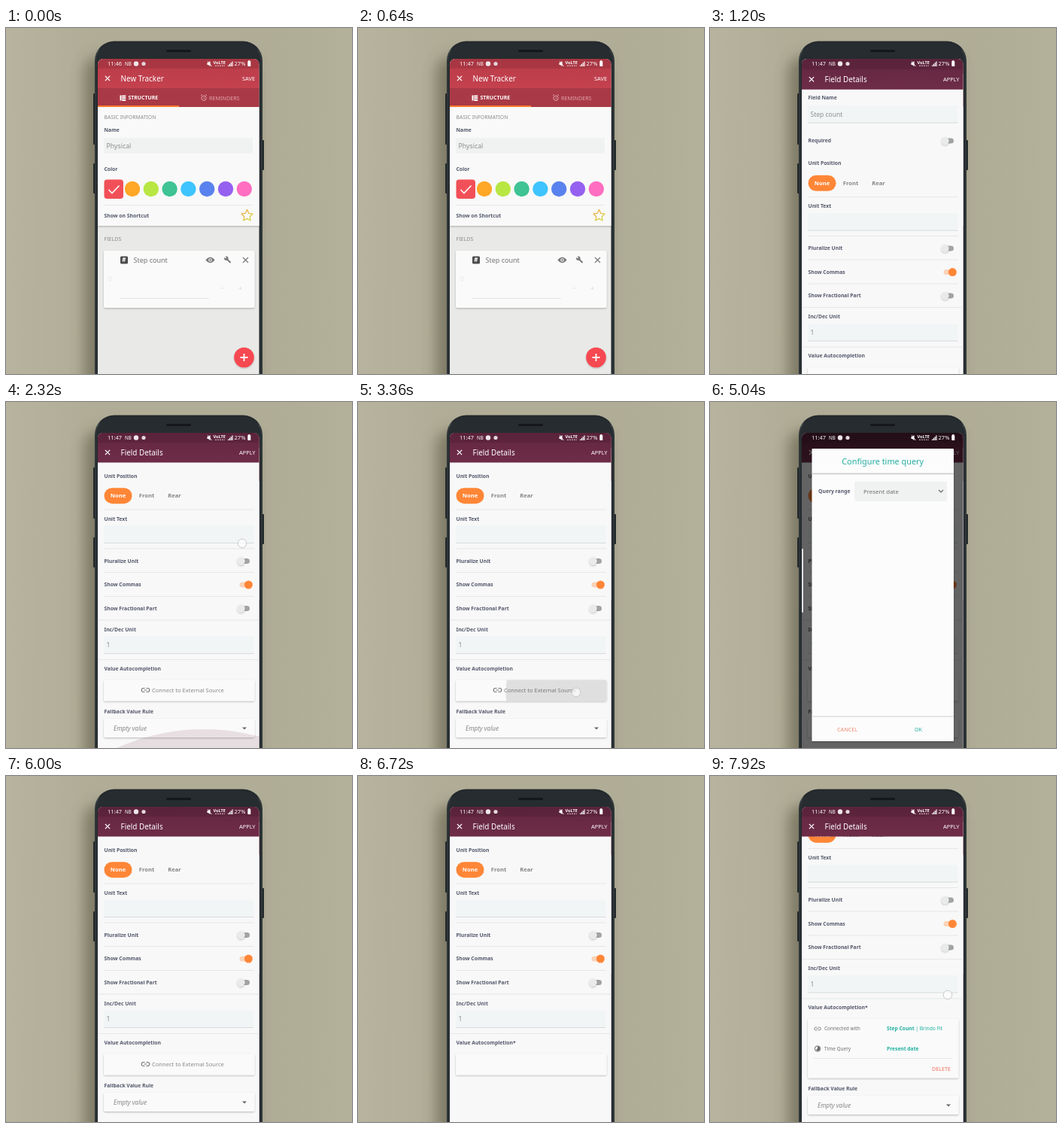
Write an HTML page that moves like this. It is 460 px wide and 460 px high and loops after 8 s.

```html
<!DOCTYPE html>
<html lang="en">
<head>
<meta charset="utf-8">
<style>
html, body { margin: 0; width: 100%; height: 100%; overflow: hidden; background: #b3b09a; }
svg { display: block; width: 100vw; height: 100vh; font-family: "Noto Sans", "Open Sans", sans-serif; }
text { white-space: pre; }
</style>
</head>
<body>
<svg id="stage" viewBox="0 0 460 460"></svg>
<script>
const stage = document.getElementById('stage');

// ---- drawing helpers (text y is the middle of the capitals) ----
const text = (x, y, size, fill, str, more = '') =>
  `<text x="${x}" y="${y + size * .357}" font-size="${size}" fill="${fill}" ${more}>${str}</text>`;
const rect = (x, y, w, h, fill, r = 0, more = '') =>
  `<rect x="${x}" y="${y}" width="${w}" height="${h}" rx="${r}" fill="${fill}" ${more}/>`;
const disc = (x, y, r, fill, more = '') => `<circle cx="${x}" cy="${y}" r="${r}" fill="${fill}" ${more}/>`;
const line = (d, color, w = 1, more = '') =>
  `<path d="${d}" fill="none" stroke="${color}" stroke-width="${w}" ${more}/>`;
const group = (id, body, more = '') => `<g id="${id}" ${more}>${body}</g>`;
const gradient = (id, dir, stops) => `<linearGradient id="${id}" ${dir}>` +
  stops.map(([at, c]) => `<stop offset="${at}" stop-color="${c}"/>`).join('') + '</linearGradient>';

const bold = 'font-weight="600"';
const label = (y, str, x = 130.5) => text(x, y, 6.8, '#54576b', str, bold);
const rule = (y, x = 130, w = 200) => rect(x, y - .5, w, 1, '#e6e7e7');
const input = (y, str) => rect(130, y, 199.5, 23, '#f2f5f5') + rect(130, y + 22.5, 199.5, 1, '#d8dbdb') +
  text(133.5, y + 11.5, 8.5, '#8b8d8d', str);
const toggle = (y, on) => on
  ? rect(310.5, y - 3.5, 14, 7, '#fbd3b8', 3.5) + disc(322.4, y, 5.5, '#ff8637')
  : rect(310, y - 3.5, 14, 7, '#a3a3a3', 3.5) + disc(312.5, y, 5.2, '#e9eaea', 'filter="url(#soft)"');
const card = (y, h, id = '') => rect(130, y, 200.5, h, '#fafafa', 2, `${id} filter="url(#soft)"`);
const cross = (x, y, r, color, w) =>
  line(`M${x - r} ${y - r}l${2 * r} ${2 * r}m0 ${-2 * r}l${-2 * r} ${2 * r}`, color, w);
const link = (x, y, s) => line('M-1 -2.5H-2.8A2.5 2.5 0 0 0 -2.8 2.5H-1M1 -2.5H2.8A2.5 2.5 0 0 1 2.8 2.5H1M-2 0H2',
  '#777', 1.1, `transform="translate(${x} ${y}) scale(${s})"`);

// ---- scenery ----
const defs = '<defs>' +
  gradient('wall', 'x2="1"', [[0, '#b7b39e'], [.25, '#b0ac96'], [.8, '#b0ad97'], [1, '#b4b19b']]) +
  gradient('body', 'x2="1"', [[0, '#2b3134'], [.02, '#3c4447'], [.035, '#22282b'], [.965, '#22282b'], [.98, '#3c4447'], [1, '#2b3134']]) +
  gradient('red', 'x2="0" y2="1"', [[0, '#b93c4a'], [1, '#c5414e']]) +
  gradient('plum', 'x2="0" y2="1"', [[0, '#642741'], [1, '#6e2c48']]) +
  gradient('warm', 'x2="1" y2="1"', [[0, '#f79a3d'], [1, '#cfdf3f']]) +
  '<filter id="soft" x="-10%" y="-20%" width="120%" height="150%"><feDropShadow dx="0" dy="1.1" stdDeviation=".8" flood-opacity=".25"/></filter>' +
  '<filter id="blur" x="-50%" width="200%"><feGaussianBlur stdDeviation="9"/></filter>' +
  `<clipPath id="screen">${rect(122, 41, 214.5, 440, '#000', 7)}</clipPath>` +
  `<clipPath id="button">${rect(130, 451, 200.5, 28, '#000', 2)}</clipPath>` +
  `<clipPath id="panel">${rect(135.5, 62, 188.5, 389, '#000')}</clipPath></defs>`;

const phone = rect(0, 0, 460, 460, 'url(#wall)') +
  rect(104, 38, 230, 480, '#4d4836', 20, 'opacity=".5" filter="url(#blur)"') +
  rect(116, 87, 4, 68, '#23282a', 1) + rect(116, 180, 4, 40, '#23282a', 1) + rect(339, 149, 4, 40, '#23282a', 1) +
  rect(118, 17.5, 223, 480, 'url(#body)', 26) + rect(120, 19.5, 219, 480, '#262c2f', 24) +
  rect(213, 29, 33, 3, '#14181a', 1.5);

const header = (title, action, x, fill) => rect(122, 41, 215, 39.5, fill) + rect(122, 41, 215, 13, '#000', 0, 'opacity=".1"') +
  cross(135, 67, 3.1, '#fff', 1.3) + text(152.5, 67.2, 9.9, '#fff', title) + text(x, 67.5, 7.4, '#fff', action);

const swatches = ['#ffa726', '#b8e642', '#3fc394', '#40c4ff', '#5a82ee', '#9560f0', '#ff6ec0'];
const star = [...Array(10)].map((_, i) => {
  const r = i % 2 ? 3.9 : 8, a = Math.PI * (i / 5 - .5);
  return `${(320.5 + r * Math.cos(a)).toFixed(1)},${(249.5 + r * Math.sin(a)).toFixed(1)}`;
}).join(' ');

const tracker = rect(122, 41, 215, 420, '#e9eae7') +
  rect(122, 105, 215, 158, '#f8f9f8', 0, 'filter="url(#soft)"') +
  header('New Tracker', 'SAVE', 314, 'url(#red)') +
  rect(122, 80, 215, 25, '#a93946') + rect(122, 103, 108, 2, '#ff7a2f') +
  rect(151.5, 89.5, 2, 7, '#fff') + [89.5, 92.2, 94.9].map(y => rect(154.2, y, 5, 2, '#fff')).join('') +
  text(162.5, 93, 6.9, '#fff', 'STRUCTURE', bold) +
  disc(263, 93.2, 3.2, 'none', 'stroke="#dfa3aa"') + line('M259 90l2-2M267 90l-2-2M263 91.5v2l1.4 1', '#dfa3aa', .9) +
  text(270, 93, 7.2, '#dfa3aa', 'REMINDERS') +
  text(130.5, 119, 6.9, '#8b8d8d', 'BASIC INFORMATION') + label(135.5, 'Name') +
  rect(130, 146, 198, 21, '#f0f2f2') + text(133.5, 156.5, 8.7, '#8b8d8d', 'Physical') +
  label(188, 'Color') + rect(130.5, 201.5, 25.5, 25.5, '#f25058', 4) + line('M136.5 215l4.5 4.5 9.5-10', '#fff', 1.6) +
  swatches.map((c, i) => disc(168 + 24.8 * i, 214, 10.2, c)).join('') +
  rule(235.5, 130, 198) + label(249.5, 'Show on Shortcut') +
  `<polygon points="${star}" fill="none" stroke="url(#warm)" stroke-width="1.2" stroke-linejoin="round"/>` +
  text(130.5, 280, 7.1, '#8b8d8d', 'FIELDS') + card(296, 76) +
  rect(152, 303.5, 10, 10, '#4c4c4c', 1.5) + text(154.3, 308.5, 8, '#fff', '#', bold) +
  text(169.5, 308.5, 9, '#707272', 'Step count') +
  '<path d="M265.5 308.5q6-7.5 12 0q-6 7.5-12 0" fill="#777"/>' + disc(271.5, 308.5, 2.3, '#fff') + disc(271.5, 308.5, 1.2, '#777') +
  line('M293.5 307l5 5', '#777', 2) + disc(292.8, 306.2, 2.7, '#777') + line('M290 303.5l2.5 2.5', '#fcfcfc', 1.6) +
  cross(318.5, 308.5, 3.5, '#777', 1.2) +
  text(136, 334, 8, '#e3e4e4', '0') + rect(152, 359, 118, 1, '#e3e4e4') +
  line('M285.5 346h4M309.5 346h4m-2-2v4', '#dcdddd', .9) +
  disc(316.5, 438, 13.3, '#f64a51', 'filter="url(#soft)"') + line('M316.5 433v10m-5-5h10', '#fff', 1.8);

// ---- field details, laid out unscrolled ----
const chip = (x, str, fill) => text(x, 206.2, 7.6, fill, str, bold + ' text-anchor="middle"');
const form = label(93, 'Field Name') + input(103, 'Step count') +
  label(150, 'Required') + toggle(150) + label(180, 'Unit Position') +
  rect(130.5, 195.7, 37, 21, '#ff8637', 10.5) + chip(149, 'None', '#fff') + chip(187, 'Front', '#858787') + chip(224, 'Rear', '#858787') +
  rule(224.5) + label(237, 'Unit Text') + input(246, '') + rule(276.5) +
  label(293, 'Pluralize Unit') + toggle(293) + rule(308) +
  label(324.5, 'Show Commas') + toggle(324.5, true) + rule(340) +
  label(356, 'Show Fractional Part') + toggle(356) + rule(371.5, 122, 215) +
  label(384, 'Inc/Dec Unit') + input(393, '1') + rule(424, 122, 215) +
  label(436, 'Value Autocompletion<tspan id="mark">*</tspan>') + card(451, 28, 'id="card"') +
  group('connect', link(185.5, 464.5, 1) + text(194, 464.5, 7.55, '#858787', 'Connect to External Source') +
    disc(290, 467, 0, '#000', 'id="ripple" clip-path="url(#button)"')) +
  group('linked', link(143, 464, .8) + text(152, 464, 6.5, '#6c6e6e', 'Connected with') +
    text(235, 464, 6.7, '#20b09f', `<tspan ${bold}>Step Count</tspan> | Brindo Fit`) +
    disc(143, 490.5, 3.7, 'none', 'stroke="#666"') + '<path d="M143 487.5a3 3 0 0 1 0 6l-2-1.5 2-1.5z" fill="#666"/>' +
    text(152, 490.5, 6.45, '#6c6e6e', 'Time Query') + text(235, 490.5, 6.7, '#20b09f', 'Present date', bold) +
    rule(503.5, 138, 184) + text(295, 517, 7.2, '#f0705c', 'DELETE')) +
  group('fallback', label(493.5, 'Fallback Value Rule') + card(502.5, 25) +
    text(143, 515.5, 8.2, '#858787', 'Empty value', 'font-style="italic"') +
    '<path d="M314 514h6l-3 3z" fill="#666"/>');

const details = rect(122, 41, 215, 420, '#f8f8f8') + rect(122, 41, 215, 20, '#5a233b') +
  group('enter', group('form', form) + disc(263, 715, 280, '#6c2a45', 'id="glow"') +
    header('Field Details', 'APPLY', 310, 'url(#plum)'));

// ---- dialog with two pages ----
const title = str => text(229.7, 79, 10.9, '#25ada0', str, 'text-anchor="middle"');
const dialog = rect(135.5, 62, 188.5, 389, '#fcfcfc', 1, 'filter="url(#soft)"') +
  '<g clip-path="url(#panel)">' + group('pages',
    text(229.7, 79, 9.9, '#25ada0', 'Connect to External Source', 'text-anchor="middle"') +
    text(146, 119, 7.9, '#6c6e6e', 'Step Count | Brindo Fit') + rule(135, 135.5, 188.5) +
    '<g transform="translate(188.5)">' + title('Configure time query') + label(119, 'Query range', 144) +
    rect(192, 105.5, 123, 26.5, '#f0f2f2', 3) + text(204, 119, 7.9, '#6c6e6e', 'Present date') +
    line('M304 117l3 3 3-3', '#666', 1.2) + text(272, 435.5, 7.1, '#25ada0', 'OK') + '</g>') +
  rect(135.5, 94.5, 188.5, 1.5, '#cfd1d1') + rect(135.5, 96, 188.5, 1, '#ececec') +
  rect(135.5, 417.5, 188.5, 1.3, '#d9dada') + text(169, 435.5, 7.2, '#f28b74', 'CANCEL') + '</g>';

const status = text(135, 47.5, 7.4, '#fff', '<tspan id="clock"></tspan>') + text(158, 47.5, 6.2, '#fff', 'NB') +
  disc(173, 47.5, 3.2, '#f0e6e9') + disc(183, 47.5, 2.6, '#e6d8dc') +
  '<path d="M267.500 46h1.500l2.500-2v7l-2.500-2h-1.500z" fill="#fff"/>' + line('M268 44l5.500 7', '#fff', .8) +
  text(275.5, 46, 5.6, '#fff', 'VoLTE', bold) + line('M278 50.200h13', '#fff', .8, 'stroke-dasharray="2 1"') +
  [0, 1, 2, 3].map(i => rect(295 + 1.8 * i, 49.5 - 1.7 * i, 1.2, 1.5 + 1.7 * i, '#fff')).join('') +
  text(303.5, 47.5, 7.6, '#fff', '27%') + rect(321.3, 44, 4, 7, '#fff', .7) + rect(322.3, 43, 2, 1.5, '#fff');

stage.innerHTML = defs + phone + '<g clip-path="url(#screen)">' + tracker + group('details', details) +
  group('dim', rect(122, 41, 215, 420, '#000', 0, 'opacity=".6"') + rect(122, 195, 2, 85, '#dfe1e1', 1)) +
  group('dialog', dialog) + status + disc(0, 0, 5.8, '#fff', 'id="touch" fill-opacity=".7" stroke="#c4c4c8" stroke-width=".9"') + '</g>';

// ---- motion ----
const el = Object.fromEntries([...stage.querySelectorAll('[id]')].map(e => [e.id, e]));
const set = (id, attrs) => { for (const k in attrs) el[id].setAttribute(k, attrs[k]); };
const ramp = (t, a, b) => Math.min(1, Math.max(0, (t - a) / (b - a)));
const ease = (t, a, b) => { const k = ramp(t, a, b); return k * k * (3 - 2 * k); };
const fade = (id, opacity) => set(id, { opacity, visibility: opacity ? 'visible' : 'hidden' });

// start, end, x, first y, last y, arrival
const touches = [
  [350, 560, 295, 308, 308, 560], [1480, 2400, 314, 300, 188, 2240], [3180, 3420, 290, 386, 386, 3420],
  [4300, 4480, 230, 119, 119, 4480], [5480, 5700, 277, 436, 436, 5700], [7280, 8100, 316, 337.5, 291, 7880]];
const touchY = ([a, , , y0, y1, b], t) => y0 + (y1 - y0) * ease(t, a + 80, b);
const reach = 80.3;

function draw(t) {
  fade('details', ease(t, 640, 880));
  set('enter', { transform: `translate(0 ${24 * (1 - ramp(t, 700, 1500)) ** 3})` });
  el.clock.textContent = t < 640 ? '11:46' : '11:47';

  const pull = 300 - touchY(touches[1], t);
  const scroll = Math.min(reach, pull) + 337.5 - touchY(touches[5], t);
  set('form', { transform: `translate(0 ${-1.2 - scroll})` });
  const glow = Math.max(0, pull - reach) / (112 - reach);
  set('glow', { cy: 740 - 25 * glow });
  fade('glow', .13 * glow * (1 - ramp(t, 2400, 2720)));

  set('ripple', { r: 93 * ramp(t, 3200, 3360) + 80 * ramp(t, 3360, 3520) });
  fade('ripple', .11 * (1 - ramp(t, 3560, 3760)));

  const shown = ease(t, 3600, 3800) * (1 - ease(t, 5780, 5980));
  fade('dim', shown);
  fade('dialog', shown);
  set('pages', { transform: `translate(${-188.5 * ease(t, 4500, 4760)})` });

  const grow = ease(t, 6760, 6960);
  fade('mark', t < 6500 ? 0 : 1);
  fade('connect', 1 - ramp(t, 6500, 6660));
  fade('linked', ramp(t, 6960, 7120));
  fade('fallback', 1 - ramp(t, 6500, 6660) + ramp(t, 6960, 7120));
  set('card', { height: 28 + 50.5 * grow });
  set('fallback', { transform: `translate(0 ${50.5 * grow})` });

  const touch = touches.find(([a, b]) => t >= a && t < b);
  fade('touch', touch ? ramp(t, touch[0], touch[0] + 60) * (1 - ramp(t, touch[1] - 60, touch[1])) : 0);
  if (touch) set('touch', { cx: touch[2], cy: touchY(touch, t) });
}

const begin = performance.now();
(function tick() {
  draw((performance.now() - begin) % 8000);
  requestAnimationFrame(tick);
})();
</script>
</body>
</html>
```
